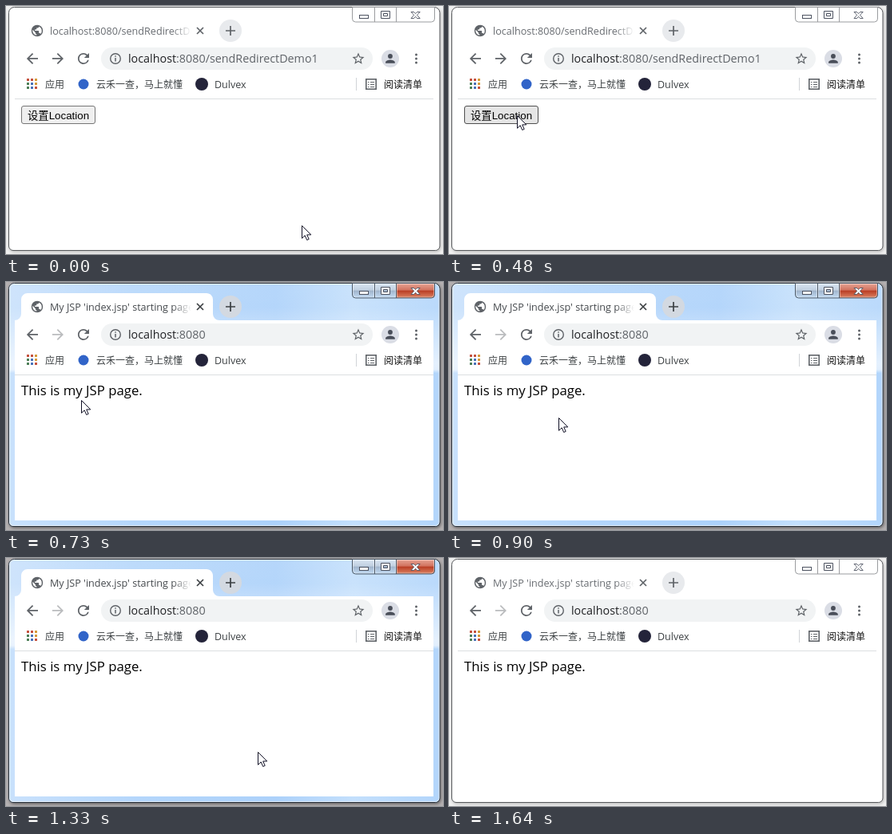
Animation, 547 px wide and 311 px high, one loop 1720 ms. Source, as an HTML page:

```html
<!DOCTYPE html>
<html lang="zh-CN">
<head>
<meta charset="utf-8">
<title>Redirect demo</title>
<style>
  html, body { margin: 0; width: 100%; height: 100%; overflow: hidden; background: #fff; }
  svg { display: block; width: 547px; height: 311px; }
  text { font-family: "Open Sans", "Noto Sans CJK SC", "Noto Sans CJK", sans-serif; white-space: pre; }
  .tab { font-size: 12.6px; }
  .url { font-size: 14.33px; fill: #5f6368; }
  .host { fill: #202124; }
  .mark { font-size: 12px; fill: #3c4043; font-family: "Noto Sans CJK SC", "Noto Sans CJK", sans-serif; }
  .latin { font-size: 12.5px; font-family: "Open Sans", sans-serif; }
  .button { font-size: 13.333px; font-family: "Liberation Sans", "Noto Sans CJK SC", "Noto Sans CJK", sans-serif; }
  .body { font-size: 16.75px; }
  .icon { fill: #5f6368; }
  .line { fill: none; stroke: #5f6368; }
</style>
</head>
<body>
<svg viewBox="0 0 547 311" xmlns="http://www.w3.org/2000/svg">
  <defs>
    <linearGradient id="glass">
      <stop offset="0" stop-color="#c9e1fc"/>
      <stop offset=".3" stop-color="#b4d6fb"/>
      <stop offset=".62" stop-color="#acd1fa"/>
      <stop offset=".8" stop-color="#c3dffc"/>
      <stop offset="1" stop-color="#b2d5fb"/>
    </linearGradient>
    <linearGradient id="gloss" x2="0" y2="1">
      <stop offset="0" stop-color="#fff" stop-opacity=".12"/>
      <stop offset=".1" stop-color="#fff" stop-opacity=".1"/>
      <stop offset=".33" stop-color="#fff" stop-opacity=".65"/>
      <stop offset=".355" stop-color="#fff" stop-opacity=".6"/>
      <stop offset=".37" stop-color="#fff" stop-opacity="0"/>
    </linearGradient>
    <linearGradient id="steel" x2="0" y2="1">
      <stop offset="0" stop-color="#dbe7f4"/>
      <stop offset=".48" stop-color="#bfcedf"/>
      <stop offset=".5" stop-color="#9fb3ca"/>
      <stop offset="1" stop-color="#c3dcf5"/>
    </linearGradient>
    <linearGradient id="red" x2="0" y2="1">
      <stop offset="0" stop-color="#e8a798"/>
      <stop offset=".48" stop-color="#d0705c"/>
      <stop offset=".5" stop-color="#b83b22"/>
      <stop offset="1" stop-color="#dc8464"/>
    </linearGradient>
    <linearGradient id="fade" gradientUnits="userSpaceOnUse" x1="208" x2="232" y1="0" y2="0">
      <stop offset="0" stop-color="#fff"/>
      <stop offset="1" stop-color="#000"/>
    </linearGradient>
    <mask id="titleMask" maskUnits="userSpaceOnUse" x="50" y="18" width="182" height="26">
      <rect x="50" y="18" width="182" height="26" fill="url(#fade)"/>
    </mask>
    <path id="frame" d="M3.5 8.5a7 7 0 0 1 7-7H536a7 7 0 0 1 7 7V301a5.500 5.500 0 0 1-5.500 5.500H9a5.500 5.500 0 0 1-5.500-5.500z"/>
    <path id="caption" d="M433.500 1.500H536.500V16a4 4 0 0 1-4 4H437.500a4 4 0 0 1-4-4z"/>
    <filter id="soft" x="-5%" y="-5%" width="110%" height="110%"><feGaussianBlur stdDeviation="2"/></filter>
  </defs>

  <g id="idle">
    <rect width="547" height="311" fill="#f1f1f1"/>
    <use href="#frame" x="1" y="1.500" fill="#aaa" filter="url(#soft)"/>
    <use href="#frame" fill="#fff" stroke="#57595c"/>
    <use href="#caption" fill="#fff" stroke="#9a9c9f"/>
    <path d="M461.500 2V20M488.500 2V20" stroke="#9a9c9f"/>
  </g>

  <g id="active">
    <rect width="547" height="311" fill="#b5b1b2"/>
    <use href="#frame" x="1" y="1.500" fill="#4c484a" filter="url(#soft)"/>
    <use href="#frame" fill="url(#glass)"/>
    <use href="#frame" fill="url(#gloss)" stroke="#26303b"/>
    <path d="M4.500 301V9a6 6 0 0 1 6-6.500H536a6 6 0 0 1 6 6.500V301a4.500 4.500 0 0 1-4.500 4.500H9a4.500 4.500 0 0 1-4.500-4.500z" fill="none" stroke="#fff" stroke-opacity=".65"/>
    <use href="#caption" fill="url(#steel)"/>
    <path d="M488.500 1.500H536.500V16a4 4 0 0 1-4 4H488.500z" fill="url(#red)"/>
    <path d="M434.500 2.500H460.500V19H438a3.500 3.500 0 0 1-3.500-3.500zM462.500 2.500H487.500V19H462.500zM489.500 2.500H535.500V15.500A3.500 3.500 0 0 1 532 19H489.500z" fill="none" stroke="#fff" stroke-opacity=".4"/>
    <use href="#caption" fill="none" stroke="#4b5968"/>
    <path d="M461.500 2V20M488.500 2V20" stroke="#4b5968"/>
    <path d="M11 48a8 8 0 0 0 8-8V22a8 8 0 0 1 8-8H251a8 8 0 0 1 8 8V40a8 8 0 0 0 8 8H535V299H11z" fill="#fff"/>
  </g>

  <!-- caption glyphs -->
  <g fill="#fff" stroke="#4c5260">
    <rect x="442.500" y="11.500" width="11" height="4"/>
    <path d="M469.500 6.500H480.500V15.500H469.500zM472.500 9.500V12.500H477.500V9.500z" fill-rule="evenodd"/>
    <path d="M507 7.500h3.600l2 2.100 2-2.100h3.600l-3.700 3.800 3.700 4.200h-3.600l-2-2.300-2 2.300H507l3.700-4.200z" stroke-width=".9"/>
  </g>

  <!-- tab strip -->
  <path class="icon" id="globe" transform="translate(30.300 22.300) scale(.725)" d="M12 2a10 10 0 1 0 0 20 10 10 0 0 0 0-20zm-1 17.930A8 8 0 0 1 4.210 10.210L9 15v1a2 2 0 0 0 2 2zm6.900-2.540A2 2 0 0 0 16 16h-1v-3a1 1 0 0 0-1-1H8v-2h2a1 1 0 0 0 1-1V7h2a2 2 0 0 0 2-2v-.410a8 8 0 0 1 2.900 12.800z"/>
  <g mask="url(#titleMask)"><text class="tab" id="title" x="55" y="35.500"></text></g>
  <circle id="plusDisc" cx="281" cy="31" r="14"/>
  <path id="tabMarks" fill="none" stroke-width="1.700" d="M239 27l8 8M247 27l-8 8M275 31H287M281 25V37"/>

  <!-- toolbar -->
  <path class="icon" transform="translate(22.400 55.400) scale(.88)" d="M20 11H7.830l5.590-5.590L12 4l-8 8 8 8 1.410-1.410L7.830 13H20z"/>
  <path id="forward" transform="translate(54.400 55.400) scale(.88)" d="M12 4l-1.410 1.410L16.170 11H4v2h12.170l-5.580 5.590L12 20l8-8z"/>
  <path class="icon" transform="translate(86.400 55.400) scale(.88)" d="M17.650 6.350A7.960 7.960 0 0 0 12 4a8 8 0 1 0 7.730 10h-2.080A6 6 0 1 1 12 6c1.660 0 3.140.690 4.220 1.780L13 11h7V4z"/>
  <rect x="119" y="52" width="340" height="28" rx="14" fill="#f1f3f4"/>
  <circle class="line" cx="137" cy="66" r="6.300" stroke-width="1.400"/>
  <path class="line" d="M137 65V69.500M137 62.300V63.800" stroke-width="1.500"/>
  <text class="url" x="153" y="71"><tspan class="host">localhost</tspan><tspan>:8080</tspan><tspan id="path">/sendRedirectDemo1</tspan></text>
  <path class="icon" transform="translate(432 57) scale(.75)" d="M22 9.240l-7.190-.620L12 2 9.190 8.630 2 9.240l5.460 4.730L5.820 21 12 17.270 18.180 21l-1.630-7.030zM12 15.400l-3.760 2.270 1-4.280-3.320-2.880 4.380-.380L12 6.100l1.710 4.040 4.380.380-3.320 2.880 1 4.280z"/>
  <circle cx="481" cy="66" r="11" fill="#dadde5"/>
  <path fill="#4a4f5a" transform="translate(472.200 57.200) scale(.73)" d="M12 12a4 4 0 1 0 0-8 4 4 0 0 0 0 8zm0 2c-2.670 0-8 1.340-8 4v2h16v-2c0-2.660-5.330-4-8-4z"/>
  <g class="icon">
    <circle cx="513.500" cy="61" r="1.500"/><circle cx="513.500" cy="66" r="1.500"/><circle cx="513.500" cy="71" r="1.500"/>
  </g>

  <!-- bookmarks -->
  <g id="apps"></g>
  <text class="mark" x="49" y="102.700">应用</text>
  <circle cx="97" cy="98" r="6.500" fill="#3164c8"/>
  <text class="mark" x="113" y="102.700">云禾一查，马上就懂</text>
  <circle cx="245" cy="98" r="8" fill="#24243a"/>
  <text class="mark latin" x="261" y="102.700">Dulvex</text>
  <path d="M438.500 90V106" stroke="#d0d3d7"/>
  <rect class="line" x="450.800" y="91.800" width="12.400" height="12.400" stroke-width="1.600"/>
  <path class="line" d="M453 95.500h1.500M456 95.500h5M453 98.500h1.500M456 98.500h5M453 101.500h1.500M456 101.500h5" stroke-width="1.200"/>
  <text class="mark" x="473" y="102.700" style="fill:#111">阅读清单</text>
  <path d="M11 116.500H535" stroke="#dcdee1"/>

  <!-- page -->
  <g id="form">
    <rect id="btn" x="19.500" y="125.500" width="92" height="22" rx="2.500"/>
    <text class="button" x="27" y="142">设置Location</text>
    <circle id="click" cx="85" cy="137" r="12" fill="#f7ef35" opacity=".78"/>
  </g>
  <text class="body" id="reply" x="19" y="142">This is my JSP page.</text>

  <path id="cursor" d="M.5 .5V16.300l3.700-3.500 2.500 5.700 2.500-1.100-2.500-5.500h5.100z" fill="#fff" stroke="#111126"/>
</svg>
<script>
  const LOOP = 1720, CLICK = 560, LOADED = 680, LEFT = 1570, BLUR = 1640;

  // time, x, y of the pointer tip; each place holds until the next
  const places = [
    [0, 370, 275], [70, 352, 266], [150, 310, 246], [230, 250, 217],
    [310, 187, 187], [400, 130, 160], [480, 85, 137],
    [730, 94, 148], [800, 112, 158], [880, 137, 170], [960, 165, 184],
    [1040, 200, 200], [1120, 237, 218], [1180, 272, 232],
    [1260, 315, 243], [1340, 360, 258], [1410, 408, 275], [1490, 455, 292]
  ];

  const $ = id => document.getElementById(id);
  const show = (id, on) => $(id).setAttribute("display", on ? "inline" : "none");
  const set = (id, attrs) => {
    for (const key in attrs) $(id).setAttribute(key, attrs[key]);
  };
  const write = (id, text) => {
    if ($(id).textContent !== text) $(id).textContent = text;
  };

  const dots = ["#c5523f", "#c5523f", "#d59a3c", "#4d7f58", "#4a72b8", "#d59a3c", "#4d7f58", "#4a72b8", "#c5523f"];
  $("apps").innerHTML = dots.map((color, i) =>
    `<rect x="${26 + i % 3 * 5}" y="${91 + Math.floor(i / 3) * 5}" width="3" height="3" fill="${color}"/>`
  ).join("");

  function buttonLook(t) {
    if (t >= CLICK) return { fill: "#f5f5f5", stroke: "#8d8d8d" };
    if (t >= 480) return { fill: "#e5e5e5", stroke: "#4f4f4f" };
    return { fill: "#efefef", stroke: "#767676" };
  }

  function draw(t) {
    const focus = t >= CLICK && t < BLUR;
    const loaded = t >= LOADED;
    show("idle", !focus);
    show("active", focus);
    show("form", !loaded);
    show("reply", loaded);
    show("click", t >= CLICK);
    show("cursor", t < LEFT);

    write("title", loaded ? "My JSP 'index.jsp' starting page" : "localhost:8080/sendRedirectDemo1");
    write("path", loaded ? "" : "/sendRedirectDemo1");
    set("title", { fill: focus ? "#45494d" : "#686c71" });
    set("plusDisc", { fill: focus ? "#d3d9e1" : "#e8eaed" });
    set("tabMarks", { stroke: focus ? "#3c4043" : "#5f6368" });
    set("forward", { fill: loaded ? "#babcbe" : "#5f6368" });
    set("btn", buttonLook(t));

    const [, x, y] = places.filter(p => p[0] <= t).pop();
    set("cursor", { transform: `translate(${x} ${y})` });
  }

  const start = performance.now();
  function tick() {
    draw((performance.now() - start) % LOOP);
    requestAnimationFrame(tick);
  }
  tick();
</script>
</body>
</html>
```
